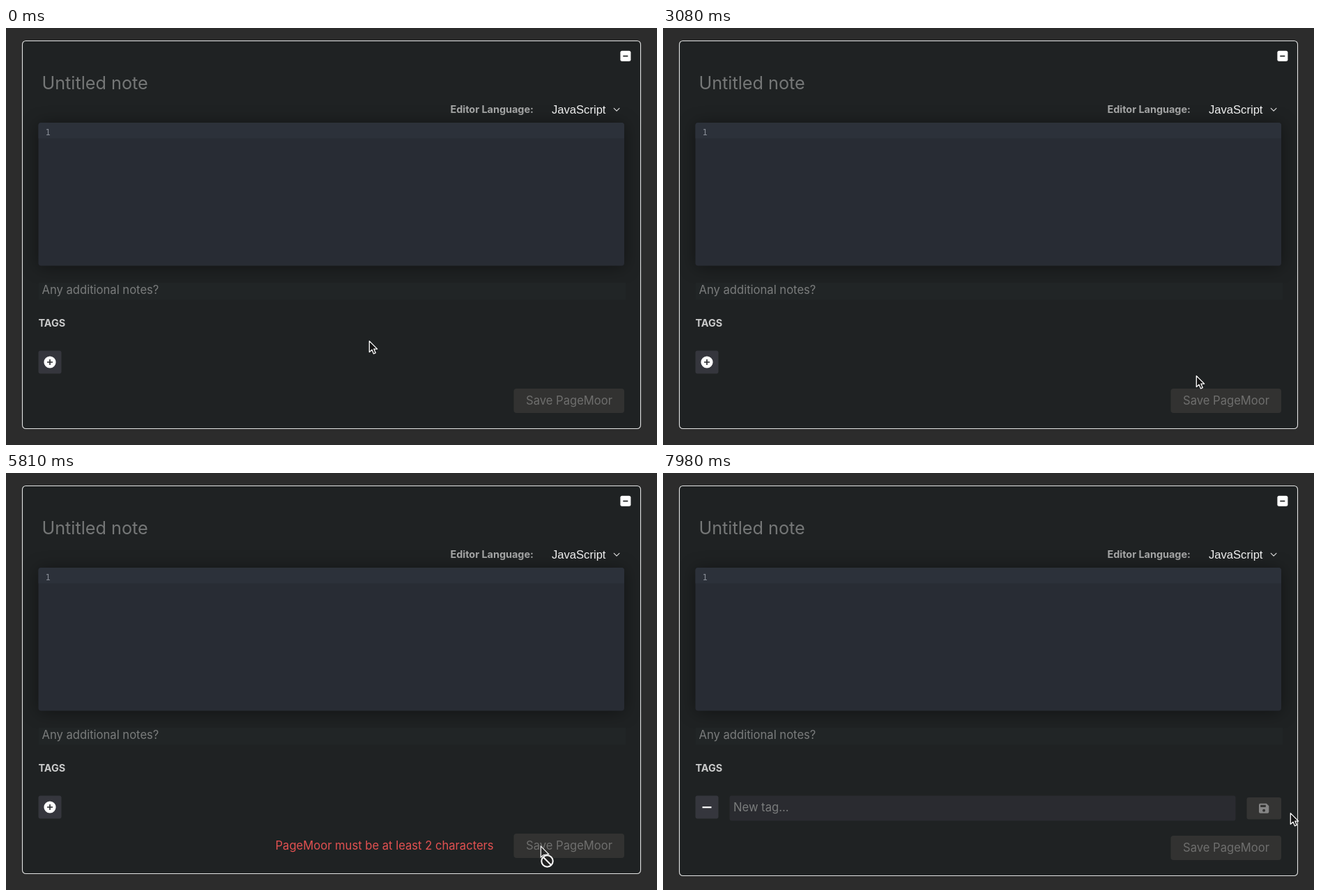
An HTML page for the animation above (8000 ms loop, 934 by 599 pixels).

```html
<!DOCTYPE html>
<html lang="en">
<head>
<meta charset="utf-8">
<title>Note editor</title>
<style>
  html, body { margin: 0; width: 100%; height: 100%; overflow: hidden; background: #2c2c2c; }
  svg { display: block; width: 934px; height: 599px; font: 16.6px Inter, sans-serif; }
  .editor { filter: drop-shadow(0 2px 12px rgba(0, 0, 0, .42)); }
  .label { font-size: 14.4px; font-weight: 700; }
  .hint { fill: #7a7c7c; }
  .line { fill: none; stroke-linecap: round; stroke-linejoin: round; }
</style>
</head>
<body>
<svg viewBox="0 0 934 599">
  <rect id="panel" x="23.5" y="18.5" width="887" height="557" rx="5" fill="#1f2223" stroke="#e4e5e5" stroke-width="1.1"/>
  <rect x="881.4" y="32.8" width="15" height="15" rx="2.5" fill="#fff"/>
  <path d="M885.3 40.4h7" stroke="#1f2223" stroke-width="1.7"/>

  <text x="51.5" y="88" font-size="25.2" fill="#757777">Untitled note</text>
  <text class="label" x="637.5" y="122" fill="#a6a7a7">Editor Language:</text>
  <text x="783" y="122.7" fill="#f4f4f4" style="font: 16.6px 'Liberation Sans', Arial, sans-serif">JavaScript</text>
  <path class="line" d="M872.3 115.3l3.8 3.9 3.8-3.9" stroke="#dcdcdc" stroke-width="1.2"/>

  <rect class="editor" x="46.5" y="136" width="840.5" height="205.5" rx="4" fill="#282c34"/>
  <path d="M46.5 158.5V140a4 4 0 0 1 4-4h832.5a4 4 0 0 1 4 4v18.5z" fill="#2c313a"/>
  <text x="56.4" y="153.5" fill="#888d96" style="font: 12px 'DejaVu Sans Mono', monospace">1</text>

  <rect x="47" y="366" width="842" height="24" fill="#212526"/>
  <text class="hint" x="51.5" y="382">Any additional notes?</text>
  <text class="label" x="46.5" y="428.6" fill="#c9caca">TAGS</text>

  <rect id="toggle" x="46.5" y="463.5" width="33" height="33" rx="3"/>
  <g id="plus">
    <circle cx="63" cy="480" r="8.6" fill="#fff"/>
    <path d="M59 480h8M63 476v8" stroke="#25262a" stroke-width="1.6"/>
  </g>
  <g id="tagForm">
    <path d="M56.5 480.200h13" stroke="#fff" stroke-width="2.2"/>
    <rect x="95.5" y="463.5" width="726" height="36" rx="3" fill="#2a2b30"/>
    <text class="hint" x="101" y="486.3">New tag...</text>
    <rect x="837.5" y="466" width="49.5" height="31.5" rx="3" fill="#343433"/>
    <path d="M857 474.700h8.700l3.600 3.600v8.400a2 2 0 0 1-2 2h-10.300a2 2 0 0 1-2-2v-10a2 2 0 0 1 2-2z" fill="#858585"/>
    <path d="M857.2 476.8h7.6v3.2h-7.6z" fill="#343433"/>
    <circle cx="862.1" cy="484.7" r="2" fill="#343433"/>
  </g>

  <text id="error" x="386.5" y="541" fill="#e25151">PageMoor must be at least 2 characters</text>
  <g id="save">
    <rect x="728.5" y="518" width="158.5" height="35" rx="4" fill="#323231"/>
    <text x="746" y="541.4" fill="#6f6f6e">Save PageMoor</text>
  </g>

  <circle id="ring" cx="73" cy="485" fill="none" stroke="#2563c4" stroke-width="3"/>
  <g id="pointer">
    <path id="arrow" d="M.3.600V16.600L4 13.200l2.500 5.700 2.800-1.200-2.500-5.600h4.900z" fill="#151515" stroke="#fff" stroke-width="1.3" stroke-linejoin="round"/>
    <g id="deny" stroke="#fff">
      <path d="M.3.600V16.400L4 13.200l7.700-1.100z" fill="#2b2b2b" stroke-width="1.2"/>
      <circle cx="9.5" cy="22" r="8.2" fill="#222" stroke-width="2"/>
      <path d="M4 16.500l11 11" stroke-width="2"/>
    </g>
    <g id="hand">
      <path d="M-1.600 1.500q0-1.700 1.500-1.700t1.700 1.700l.7 4.600q2.600-1.200 3.200.7 2.200-.8 2.700 1 2-.4 2 1.800 0 3-1.400 5.900v1.900h-8q-.5-2.200-2.200-3.800l-2.800-3.200q-.9-1.300.1-2 1-.6 2.700 1.200z" fill="#fff" stroke="#191919"/>
      <path d="M2.700 11.500v3M4.900 11.500v3M7 11.500v3" stroke="#333" stroke-width=".8"/>
    </g>
    <path id="beam" class="line" d="M-3-8q3 0 3 2.500v11q0 2.500-3 2.500M3-8q-3 0-3 2.500M0 5.500q0 2.500 3 2.500" stroke="#eee" stroke-width="1.3"/>
  </g>
</svg>
<script>
const LOOP = 8000;
const OPEN_AT = 7210;
const CLICK_AT = 7060;

// Pointer moves: start time, end time, target x, target y
const moves = [
  [70, 1050, 762, 528.5],
  [2070, 2400, 765, 499],
  [3100, 3780, 767, 535.5],
  [5830, 6820, 72.5, 485],
  [7480, 7950, 900, 488]
];

const el = id => document.getElementById(id);
const show = (id, on) => el(id).setAttribute('display', on ? 'inline' : 'none');
const set = (id, attrs) => {
  for (const name in attrs) el(id).setAttribute(name, attrs[name]);
};
const progress = (t, from, to) => Math.min(1, Math.max(0, (t - from) / (to - from)));
const smooth = p => p * p * (3 - 2 * p);
const fade = (t, start) => smooth(progress(t, start, start + 480));

function pointerAt(t) {
  let x = 521, y = 449;
  for (const [from, to, toX, toY] of moves) {
    const p = smooth(progress(t, from, to));
    x += (toX - x) * p;
    y += (toY - y) * p;
  }
  return [x, y];
}

function pointerShape(x, y, open) {
  const inside = (l, t, r, b) => x >= l && x <= r && y >= t && y <= b;
  const shift = open ? 3 : 0;
  if (inside(729, 518 + shift, 887, 553 + shift)) return 'deny';
  if (inside(47, 464, 79, 496)) return 'hand';
  if (open && inside(96, 464, 821, 499)) return 'beam';
  if (open && inside(838, 466, 887, 497)) return 'deny';
  return 'arrow';
}

function draw(t) {
  const open = t >= OPEN_AT;
  const [x, y] = pointerAt(t);
  const shape = pointerShape(x, y, open);

  set('pointer', { transform: `translate(${x} ${y})` });
  for (const id of ['arrow', 'deny', 'hand', 'beam']) show(id, id === shape);

  set('error', { opacity: fade(t, 810) - fade(t, 2140) + fade(t, 3470) - fade(t, 5880) });
  set('toggle', { fill: shape === 'hand' ? '#303234' : '#35363d' });
  show('plus', !open);
  show('tagForm', open);
  set('panel', { height: open ? 560 : 557 });
  set('save', { transform: `translate(0 ${open ? 3 : 0})` });

  const ripple = progress(t, CLICK_AT, CLICK_AT + 230);
  show('ring', ripple > 0 && ripple < 1);
  set('ring', { r: 15 + 18 * ripple, opacity: 1 - ripple });
}

function tick() {
  draw(performance.now() % LOOP);
  requestAnimationFrame(tick);
}
tick();
</script>
</body>
</html>
```
